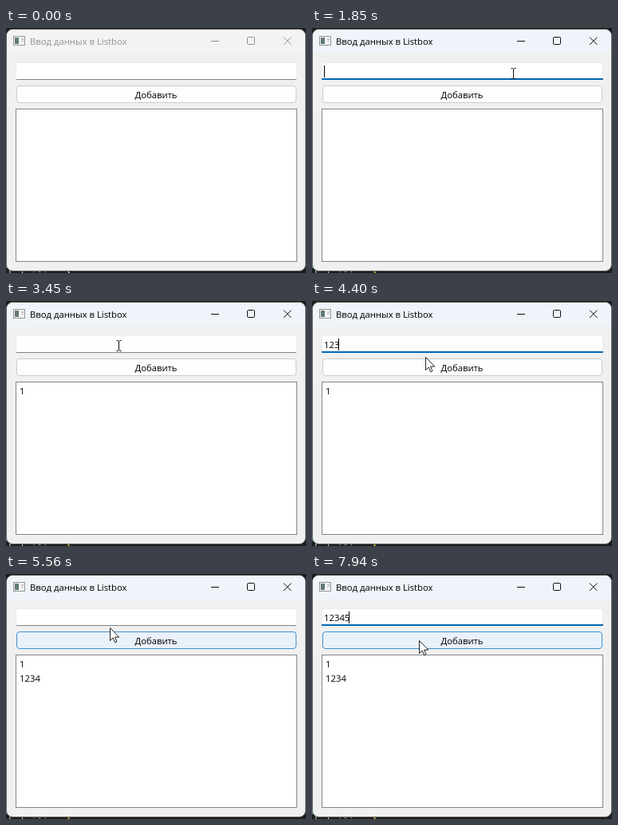
Recreate the animation shown at these times as an HTML page. Size 376 by 307 pixels, loop 8000 ms.

```html
<!DOCTYPE html>
<html lang="ru">
<head>
<meta charset="utf-8">
<style>
  html, body { margin: 0; height: 100%; overflow: hidden; background: #1c1c1e; }
  svg { display: block; font: 11.3px "Open Sans", "Noto Sans", sans-serif; }
  .mono { font: 13px "DejaVu Sans Mono", monospace; }
</style>
</head>
<body>
<svg width="376" height="307" viewBox="0 0 376 307">
  <!-- editor showing behind the window -->
  <path id="behind" d="M0 150h2v6h-2zM0 170h2v6h-2zM0 189h2v7h-2zM0 284h2v17h-2z"/>
  <text class="mono" x="3" y="304" fill="#c8c8c8">р р ДД</text>
  <path id="bracket" d="M75.500 302l4 5" stroke-width="1.500"/>

  <rect x=".5" y="1.500" width="375" height="303" rx="8" fill="#f0f0f0" stroke="#5c5c5c"/>
  <path id="titleBar" d="M1 32V10a8 8 0 0 1 8-8h358a8 8 0 0 1 8 8v22z"/>
  <rect x="9.500" y="10.500" width="14" height="11" fill="#f4f4f4" stroke="#959595"/>
  <path d="M11 12h5v8h-5z" fill="#5f7a78"/>
  <path d="M19 13h3v2h-3zM19 16h3v1h-3z" fill="#c0c0c0"/>
  <text id="title" x="30" y="21">Ввод данных в Listbox</text>
  <path id="controls" fill="none" d="M257 16.500h10M303.500 11.500h7a1 1 0 0 1 1 1v7a1 1 0 0 1-1 1h-7a1 1 0 0 1-1-1v-7a1 1 0 0 1 1-1zM348 11.500l9.500 9.500M357.500 11.500l-9.500 9.500"/>

  <rect x="12.500" y="43.500" width="352" height="21.500" rx="2" fill="#fff" stroke="#ebebeb"/>
  <path id="underline"/>
  <text id="entry" x="15" y="59"></text>
  <path id="caret" d="M.5 47v15" stroke="#000"/>

  <rect id="button" x="13.500" y="72.500" width="350" height="21" rx="3.500"/>
  <text x="188" y="88" text-anchor="middle">Добавить</text>

  <rect x="12.500" y="101.500" width="352" height="191" fill="#fff" stroke="#828790"/>
  <text id="item0" x="17" y="117"></text>
  <text id="item1" x="17" y="135"></text>

  <g id="mouse">
    <circle id="press" r="11.500" fill="#f6f01e" opacity=".6"/>
    <path id="arrow" d="M.5.500v16l3.700-3.500 2.500 5.800 2.300-1-2.500-5.700h5.200z" fill="#fff" stroke="#222"/>
    <path id="beam" d="M-2.500-5.500h2l1 1 1-1h2M.5-5v12M-2.500 7.500h2l1-1 1 1h2" fill="none" stroke="#111"/>
  </g>
</svg>
<script>
const LOOP = 8000, CLICK = 70, FADE = 200;
const ENTRANCE = { start: 720, x: 315, y: 192 };
// start, end, x, y
const moves = [
  [720, 1400, 252, 56],
  [2190, 2600, 212, 88],
  [2950, 3450, 141, 55],
  [4200, 4680, 143, 78],
  [5460, 5840, 114, 54],
  [7730, 7940, 134, 83]
];
// clicks fall on the entry and the button in turn
const clicks = [1570, 2740, 3590, 5140, 5910];
// keystrokes for each entry; digits are typed in ascending order
const keys = [[2120], [3860, 3930, 4200, 4470], [6310, 6700, 7200, 7470, 7730]];

const $ = id => document.getElementById(id);
const set = (id, attrs) => { for (const k in attrs) $(id).setAttribute(k, attrs[k]); };
const show = (id, on) => set(id, { visibility: on ? 'visible' : 'hidden' });
const mix = (a, b, f) => `rgb(${a.map((v, i) => Math.round(v + (b[i] - v) * f))})`;
const countUntil = (times, t) => times.filter(time => time <= t).length;
const digits = n => '12345'.slice(0, n);
const easeOut = p => 1 - (1 - p) ** 2;

function mouseAt(t) {
  let { x, y } = ENTRANCE;
  for (const [start, end, toX, toY] of moves) {
    const p = easeOut(Math.min(1, Math.max(0, (t - start) / (end - start))));
    x += (toX - x) * p;
    y += (toY - y) * p;
  }
  return { x, y };
}

// share of the last FADE ms that the mouse spent over the button
function hoverAt(t) {
  const steps = 20;
  let over = 0;
  for (let i = 0; i < steps; i++) {
    const { y } = mouseAt(t - FADE * i / steps);
    if (y >= 72 && y < 94) over++;
  }
  return over / steps;
}

function draw(t) {
  const pressed = countUntil(clicks, t), released = countUntil(clicks, t - CLICK);
  const active = pressed > 0, focus = pressed % 2 === 1;
  const added = Math.floor(released / 2);

  set('behind', { fill: active ? '#2f8fb0' : '#77777a' });
  set('bracket', { stroke: active ? '#d8c83c' : '#c8c8c8' });
  set('titleBar', { fill: active ? '#eef4f9' : '#f3f3f3' });
  set('title', { fill: active ? '#000' : '#929292' });
  set('controls', { stroke: active ? '#111' : '#8e8e8e' });

  const length = countUntil(keys[added], t);
  $('entry').textContent = digits(length);
  set('underline', focus
    ? { d: 'M12 63h353v1q0 1-1 1h-351q-1 0-1-1z', fill: '#0067b8' }
    : { d: 'M13 64h351v1h-351z', fill: '#868686' });
  set('caret', { transform: `translate(${Math.floor(15 + 6.3 * length)})` });
  show('caret', focus);

  const glow = hoverAt(t);
  set('button', {
    fill: mix([253, 253, 253], [224, 236, 249], glow),
    stroke: mix([204, 204, 204], [0, 120, 212], glow)
  });
  for (let i = 0; i < 2; i++) $('item' + i).textContent = i < added ? digits(keys[i].length) : '';

  const { x, y } = mouseAt(t);
  const entered = t >= ENTRANCE.start, overEntry = y < 65;
  set('mouse', { transform: `translate(${Math.round(x)} ${Math.round(y)})` });
  show('press', pressed > released);
  show('arrow', entered && !overEntry);
  show('beam', entered && overEntry);
}

function frame() {
  draw(performance.now() % LOOP);
  requestAnimationFrame(frame);
}
frame();
</script>
</body>
</html>
```
